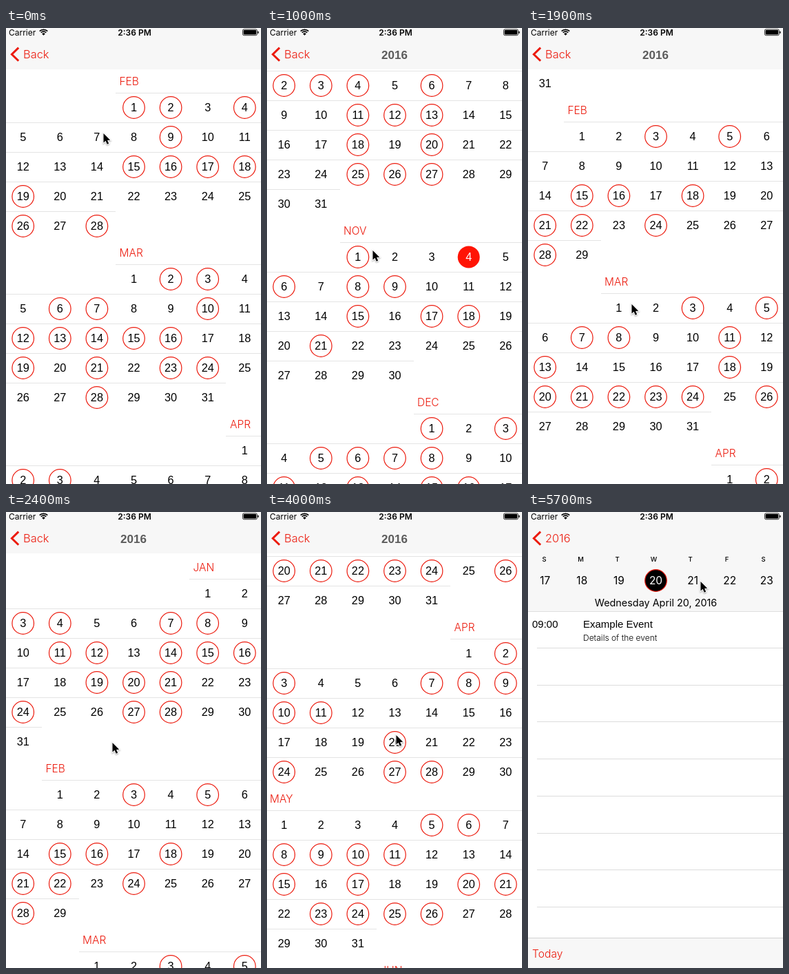
Recreate the animation shown at these times as an HTML page with a canvas. Size 370 by 662 pixels, loop 5.8 s.

```html
<!DOCTYPE html>
<html>
<head>
<meta charset="utf-8">
<style>
html, body { margin: 0; width: 370px; height: 662px; overflow: hidden; background: #fff; }
canvas { display: block; }
</style>
</head>
<body>
<canvas id="stage" width="370" height="662"></canvas>
<script>
const ctx = document.getElementById('stage').getContext('2d');
const W = 370, H = 662, LOOP = 5800, STEP = 100;
const RED = '#ec1b0e', BAR = '#f7f7f7', RULE = '#e4e4e4';
const HELV = '"Liberation Sans", Arial, sans-serif';
const SYS = 'Inter, Roboto, sans-serif';
const NAV = 60, HEAD = 34, ROW = 43, COL = 53.6;
const NAMES = ['JAN', 'FEB', 'MAR', 'APR', 'MAY', 'JUN', 'JUL', 'AUG', 'SEP', 'OCT', 'NOV', 'DEC'];

// Days with events, January 2016 onwards; empty months use a simple rule.
const EVENTS = [
  '3-4 7-8 11-12 14-16 19-21 24 27-28',
  '3 5 15-16 18 21-22 24 28',
  '3 5 7-8 11 13 18 20-24 26',
  '2-3 7-11 20 24 27-28',
  '5-6 8-11 15 17 20-21 23-26',
  '', '',
  '2-3 7 10-11 13-15 18-20 26',
  '1 5 8 11-13 16-19 21-22 27',
  '2-4 6 11-13 18 20 25-27',
  '1 6 8-9 15 17-18 21',
  '1 3 5-8 11 13 15-16 20 22-25 27-28',
  '4-5 8-11 13-20 24-25',
  '1-2 4 9 15-19 26 28',
  '2-3 6-7 10 12-16 19 21 23-24 28',
  '2-3'
];

function eventDays(spec, m) {
  const days = new Set();
  if (!spec) {
    for (let d = 1; d <= 31; d++) if ((d * 7 + m * 3) % 5 < 2) days.add(d);
    return days;
  }
  for (const part of spec.split(' ')) {
    const [a, b = a] = part.split('-').map(Number);
    for (let d = a; d <= b; d++) days.add(d);
  }
  return days;
}

let nextTop = 0;
const months = EVENTS.map((spec, m) => {
  const first = new Date(2016, m, 1).getDay();
  const count = new Date(2016, m + 1, 0).getDate();
  const rows = Math.ceil((first + count) / 7);
  const month = { m, first, count, rows, top: nextTop, events: eventDays(spec, m) };
  nextTop += HEAD + rows * ROW;
  return month;
});

// Monotone cubic track through [time, value] keys.
function track(keys) {
  const slope = i => (keys[i + 1][1] - keys[i][1]) / (keys[i + 1][0] - keys[i][0]);
  const tangent = i => {
    if (i === 0 || i === keys.length - 1) return 0;
    const a = slope(i - 1), b = slope(i);
    return a * b <= 0 ? 0 : 2 * a * b / (a + b);
  };
  return t => {
    if (t <= keys[0][0]) return keys[0][1];
    const i = keys.findIndex((k, n) => n < keys.length - 1 && t < keys[n + 1][0]);
    if (i < 0) return keys[keys.length - 1][1];
    const h = keys[i + 1][0] - keys[i][0], u = (t - keys[i][0]) / h, v = 1 - u;
    return keys[i][1] * (1 + 2 * u) * v * v + h * tangent(i) * u * v * v +
      keys[i + 1][1] * u * u * (3 - 2 * u) - h * tangent(i + 1) * u * u * v;
  };
}

const scrollAt = track([[0, 3306], [300, 2960], [600, 2590], [900, 2430], [1400, 1767],
  [1700, 830], [2000, -20], [2100, -100], [2400, -63], [2500, -60], [2800, 250],
  [3000, 480], [3300, 630], [3600, 640]]);
const mouseX = track([[0, 141], [600, 157], [1400, 148], [2400, 154], [3000, 160],
  [3300, 160], [3700, 187], [4900, 187], [5400, 247], [5700, 250]]);
const mouseY = track([[0, 153], [400, 410], [600, 429], [900, 300], [1400, 525],
  [1800, 420], [2400, 335], [2600, 390], [3000, 232], [3300, 232], [3700, 324],
  [4900, 324], [5400, 101]]);

// Share of the push transition still to go, as a damped spring.
function pushLeft(t) {
  const k = Math.max(0, t - 4000) * 0.0158;
  return (1 + k) * Math.exp(-k);
}

function text(str, x, cy, size, { font = HELV, weight = 400, color = '#000', align = 'left' } = {}) {
  ctx.font = `${weight} ${size}px ${font}`;
  ctx.textAlign = align;
  ctx.fillStyle = color;
  ctx.fillText(str, x, cy + size * 0.36);
}

function rect(x, y, w, h, color) {
  ctx.fillStyle = color;
  ctx.fillRect(x, y, w, h);
}

function circle(x, y, r, fill, stroke) {
  ctx.beginPath();
  ctx.arc(x, y, r, 0, Math.PI * 2);
  if (fill) { ctx.fillStyle = fill; ctx.fill(); }
  if (stroke) { ctx.strokeStyle = stroke; ctx.lineWidth = 1.2; ctx.stroke(); }
}

function drawMonth(mo, y) {
  const edge = i => Math.max(0, Math.round(i * 53.4 - 1));
  text(NAMES[mo.m % 12], 4 + mo.first * 53.5, y + 17.5, 15.5, { font: SYS, weight: 300, color: RED });
  for (let r = 0; r < mo.rows; r++) {
    const from = r === 0 ? edge(mo.first) : 0;
    const to = r === mo.rows - 1 ? edge(mo.first + mo.count - r * 7) : W;
    rect(from, y + HEAD + r * ROW, (to > 367 ? W : to) - from, 1, RULE);
  }
  for (let d = 1; d <= mo.count; d++) {
    const cell = mo.first + d - 1;
    const x = 24.7 + (cell % 7) * COL;
    const cy = y + HEAD + Math.floor(cell / 7) * ROW + 21.5;
    const today = mo.m === 10 && d === 4;
    if (today) circle(x, cy, 16, '#ff1404');
    else if (mo.events.has(d)) circle(x, cy, 15.8, null, RED);
    text(d, x, cy, 16.3, { align: 'center', color: today ? '#fff' : '#000' });
  }
}

function drawYear(scroll) {
  rect(0, 0, W, H, '#fff');
  for (const mo of months) {
    const y = mo.top - scroll;
    if (y < H && y + HEAD + mo.rows * ROW > 0) drawMonth(mo, y);
  }
}

function drawDay(x) {
  ctx.save();
  ctx.translate(x, 0);
  rect(-2, NAV, W + 2, H - NAV, '#fff');
  rect(-2, NAV, W + 2, 84, BAR);
  rect(-2, 144, W + 2, 1, '#dedede');
  for (let i = 0; i < 7; i++) {
    const cx = 24.7 + i * COL, chosen = i === 3;
    text('SMTWTFS'[i], 23.5 + i * 53, 69, 9.5, { font: SYS, weight: 500, align: 'center' });
    if (chosen) circle(cx, 99.5, 15.8, '#000', RED);
    text(17 + i, cx, 99.5, 15.5, { font: SYS, align: 'center', color: chosen ? '#fff' : '#000' });
  }
  text('Wednesday April 20, 2016', 185.5, 131.5, 14.4, { font: SYS, align: 'center' });
  text('09:00', 6, 162.5, 15);
  text('Example Event', 80, 162.5, 15);
  text('Details of the event', 80, 183, 12, { font: SYS, weight: 300 });
  for (let i = 0; i < 8; i++) rect(13, Math.round(197 + i * 53.7), W, 1, '#dcdcdc');
  rect(-2, 618, W + 2, 44, BAR);
  rect(-2, 618, W + 2, 1, '#d2d2d2');
  text('Today', 6, 641.5, 15.7, { font: SYS, weight: 300, color: RED });
  ctx.restore();
}

function drawNav(title, p) {
  rect(0, 0, W, NAV, BAR);
  ctx.strokeStyle = RED;
  ctx.lineWidth = 3;
  ctx.beginPath();
  ctx.moveTo(18.2, 28.6);
  ctx.lineTo(8.4, 38.2);
  ctx.lineTo(18.2, 47.8);
  ctx.stroke();

  const light = { font: SYS, weight: 300, color: RED };
  const shift = 141 * p;
  ctx.globalAlpha = Math.max(0, 1 - p * 1.6);
  text('Back', 25 - 60 * p, 38.5, 16.4, light);
  ctx.globalAlpha = 1 - p;
  text(title, 185 - shift, 38.5, 17, { weight: 700, color: '#5c5c5c', align: 'center' });
  ctx.globalAlpha = p;
  if (p > 0) text('2016', 166 - shift, 38.5, 16.4, light);
  ctx.globalAlpha = 1;
}

function drawStatus() {
  text('Carrier', 4, 6.5, 12, { font: SYS });
  text('2:36 PM', 186.5, 6.5, 12, { font: SYS, weight: 600, align: 'center' });
  ctx.strokeStyle = '#000';
  ctx.lineWidth = 1.7;
  for (const r of [8.2, 5.3]) {
    ctx.beginPath();
    ctx.arc(54.5, 10.5, r, -Math.PI * 0.75, -Math.PI * 0.25);
    ctx.stroke();
  }
  ctx.fillStyle = '#000';
  ctx.beginPath();
  ctx.moveTo(54.5, 10.8);
  ctx.arc(54.5, 10.8, 3.3, -Math.PI * 0.75, -Math.PI * 0.25);
  ctx.fill();
  ctx.lineWidth = 0.8;
  ctx.beginPath();
  ctx.roundRect(343.4, 1.9, 21, 8.8, 2);
  ctx.stroke();
  ctx.beginPath();
  ctx.roundRect(344.6, 3.1, 18.6, 6.4, 1);
  ctx.fill();
  rect(365.3, 4.8, 1.4, 3, '#000');
}

function drawCursor(x, y) {
  ctx.save();
  ctx.translate(x, y);
  ctx.beginPath();
  [[0.5, 0], [0.5, 13.6], [3.6, 10.8], [5.7, 15.8], [8.2, 14.8], [6.1, 9.9], [10.2, 9.7]]
    .forEach(([px, py]) => ctx.lineTo(px, py));
  ctx.closePath();
  ctx.shadowColor = 'rgba(0,0,0,0.35)';
  ctx.shadowBlur = 2;
  ctx.shadowOffsetY = 1;
  ctx.lineWidth = 2;
  ctx.strokeStyle = '#fff';
  ctx.stroke();
  ctx.shadowColor = 'transparent';
  ctx.fillStyle = '#000';
  ctx.fill();
  ctx.restore();
}

function draw(t) {
  const scroll = Math.round(scrollAt(t));
  const left = pushLeft(t), p = 1 - left;
  const title = t < STEP ? '' : scroll > 2455 ? '2017' : '2016';
  ctx.save();
  ctx.translate(-Math.round(W * 0.3 * p), 0);
  drawYear(scroll);
  ctx.restore();
  if (p > 0) {
    rect(0, 0, W, H, `rgba(0,0,0,${0.1 * p})`);
    drawDay(Math.round(W * left));
  }
  drawNav(title, p);
  drawStatus();
  drawCursor(Math.round(mouseX(t)), Math.round(mouseY(t)));
}

const start = performance.now();
function tick() {
  const t = Math.max(0, performance.now() - start) % LOOP;
  draw(Math.floor(t / STEP) * STEP);
  requestAnimationFrame(tick);
}
tick();
</script>
</body>
</html>
```
